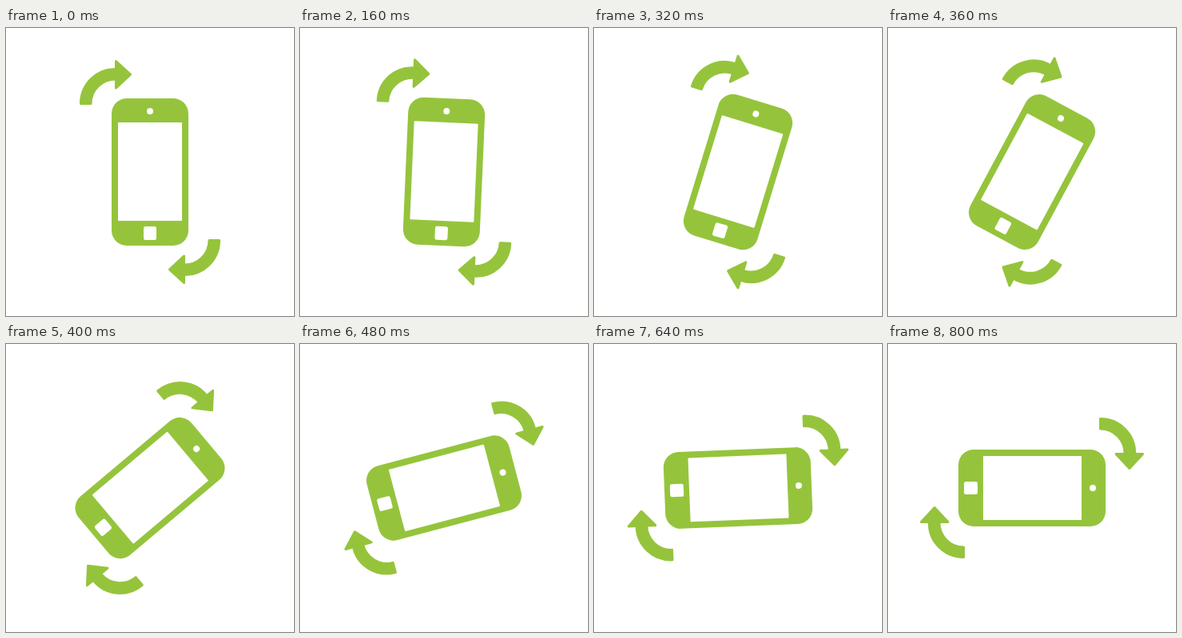
These frames come from a looping animation (360x360 px, 4 s). An HTML page:

```html
<!DOCTYPE html>
<html lang="en">
<head>
<meta charset="utf-8">
<title>Rotate your device</title>
<style>
  html, body { margin: 0; width: 100%; height: 100%; overflow: hidden; background: #fff; }
  svg { display: block; width: 100%; height: 100%; }
</style>
</head>
<body>
<svg viewBox="0 0 360 360">
  <g id="device" fill="#95c43c">
    <rect x="132" y="88" width="96" height="184" rx="19"/>
    <g fill="#fff">
      <rect x="140" y="118" width="80" height="123" rx="1"/>
      <circle cx="180" cy="104" r="4"/>
      <rect x="172" y="248" width="16" height="17" rx="2.5"/>
    </g>
    <g stroke="#95c43c" stroke-width="3" stroke-linejoin="round">
      <path id="arrow" d="M93.5 94.5A42.5 43 0 0 1 137.5 51.5V41.5L155.5 58.2L137.5 75V64A31 30.5 0 0 0 106 94.5Z"/>
      <use href="#arrow" transform="rotate(180 180 180)"/>
    </g>
  </g>
</svg>
<script>
  const LOOP = 4000, TURN = 800, STEP = 40;
  const device = document.getElementById('device');
  const start = performance.now();

  // Cubic Bezier easing with control points (x1, 0) and (x2, 1).
  function ease(t, x1 = 0.805, x2 = 0.168) {
    if (t <= 0 || t >= 1) return t <= 0 ? 0 : 1;
    let lo = 0, hi = 1, s;
    for (let i = 0; i < 30; i++) {
      s = (lo + hi) / 2;
      const r = 1 - s;
      const x = 3 * r * r * s * x1 + 3 * r * s * s * x2 + s ** 3;
      if (x < t) lo = s; else hi = s;
    }
    return s * s * (3 - 2 * s);
  }

  function draw() {
    const time = Math.max(0, performance.now() - start) % LOOP;
    const stepped = Math.floor(time / STEP) * STEP;
    const angle = 90 * ease(stepped / TURN);
    device.setAttribute('transform', `rotate(${angle.toFixed(3)} 180 180)`);
    requestAnimationFrame(draw);
  }
  draw();
</script>
</body>
</html>
```
